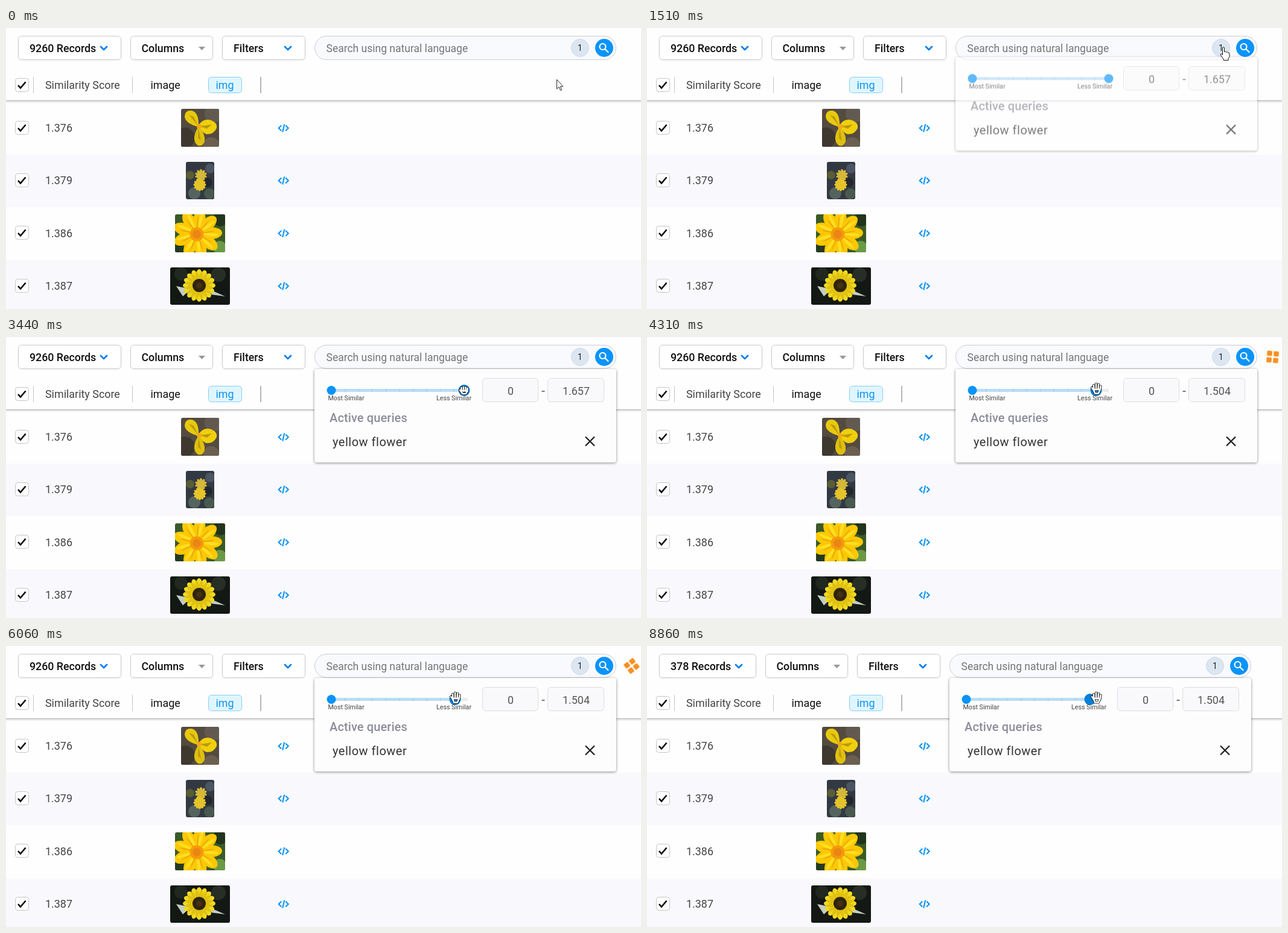
These frames come from a looping animation (1052 by 466 pixels, 9.48 s). An HTML page:

```html
<!DOCTYPE html>
<html lang="en">
<head>
<meta charset="utf-8">
<title>Similarity search</title>
<style>
@property --drag { syntax: '<length>'; inherits: true; initial-value: 0px; }
@property --gap { syntax: '<length>'; inherits: true; initial-value: 0px; }

html, body { margin: 0; width: 100%; height: 100%; overflow: hidden; background: #fefefe; }
svg { display: block; width: 1052px; height: 466px; }
text { font: 400 17.9px Roboto, Arial, sans-serif; fill: #444; }
.dark { fill: #111; }
.medium { font-weight: 500; font-size: 17.8px; fill: #111; }
.hint { font-size: 17.5px; fill: #757575; }
.blue { fill: #0b93f6; }
.mid { text-anchor: middle; fill: #555; }
.tiny { font-size: 10.7px; fill: #444; }
.query { font-size: 20px; letter-spacing: .5px; fill: #333; }
.title { font-size: 20px; font-weight: 500; letter-spacing: .1px; fill: #8c8d9b; }
.line { fill: none; stroke-linecap: round; stroke-linejoin: round; }
.btn { fill: #fff; stroke: #cbcbcb; filter: drop-shadow(0 1px 1px #0001); }
.field { fill: #f9f9fb; stroke: #dcdde2; }

/* one loop is 9480 ms */
.bar, .wide, .old, .new, .arrow, .point, .open, .fist, .spin, .dim, .lit, .before, .after, .loader
  { animation: 9480ms step-end infinite; }
.panel, .drag, .cursor, .squares { animation: 9480ms linear infinite; }

.bar { animation-name: bar; }
@keyframes bar { 0% { transform: none } 82.81%, to { transform: translateX(-10px) } }
.wide { animation-name: wide; }
@keyframes wide { 0% { width: 170px } 82.81%, to { width: 160px } }
.old { animation-name: old; }
@keyframes old { 0% { opacity: 1 } 82.81%, to { opacity: 0 } }
.new { animation-name: new; }
@keyframes new { 0% { opacity: 0 } 82.81%, to { opacity: 1 } }

.panel { animation-name: panel; }
@keyframes panel {
  0%, 14.24% { opacity: 0; transform: translateY(-13px) }
  16.88%, to { opacity: 1; transform: none }
}
.spin { animation-name: spin; }
@keyframes spin { 0% { opacity: 0 } 21.41% { opacity: 1 } 24.79%, to { opacity: 0 } }
.dim { animation-name: dim; }
@keyframes dim { 0% { opacity: 1 } 26.58%, to { opacity: 0 } }
.lit { animation-name: lit; }
@keyframes lit { 0% { opacity: 0 } 26.58%, to { opacity: 1 } }
.before { animation-name: before; }
@keyframes before { 0% { opacity: 1 } 43.25%, to { opacity: 0 } }
.after { animation-name: after; }
@keyframes after { 0% { opacity: 0 } 43.25%, to { opacity: 1 } }

.drag { animation-name: drag; }
@keyframes drag {
  0%, 32.7% { --drag: 0px }
  36.29% { --drag: 6px }
  41.77%, to { --drag: 21px }
}
.knob { transform: translateX(calc(0px - var(--drag))); }
.fill { width: calc(226px - var(--drag)); }

.cursor { animation-name: cursor; }
@keyframes cursor {
  0% { transform: translate(912px, 85px) }
  4.32% { transform: translate(912px, 85px); animation-timing-function: ease-in-out }
  8.65% { transform: translate(955px, 31px) }
  19.94% { transform: translate(955px, 31px); animation-timing-function: ease-in-out }
  22.89% { transform: translate(810px, 87px); animation-timing-function: ease-out }
  29.75%, 32.7% { transform: translate(764px, 88px) }
  36.29% { transform: translate(758px, 88px) }
  41.77%, to { transform: translate(744px, 85px) }
}
.arrow { animation-name: arrow; }
@keyframes arrow { 0% { opacity: 1 } 7.38% { opacity: 0 } 20.6% { opacity: 1 } 26.58%, to { opacity: 0 } }
.point { animation-name: point; }
@keyframes point { 0% { opacity: 0 } 7.38% { opacity: 1 } 20.6%, to { opacity: 0 } }
.open { animation-name: open; }
@keyframes open { 0% { opacity: 0 } 26.58% { opacity: 1 } 32.7% { opacity: 0 } 43.25%, to { opacity: 1 } }
.fist { animation-name: fist; }
@keyframes fist { 0% { opacity: 0 } 32.7% { opacity: 1 } 43.25%, to { opacity: 0 } }
.edge { fill: #111; stroke: #111; stroke-width: 4.2px; }
.skin { fill: #fff; stroke: #fff; stroke-width: 2.5px; }

.loader { animation-name: loader; }
@keyframes loader { 0% { opacity: 0 } 43.67% { opacity: 1 } 82.81%, to { opacity: 0 } }
.squares { animation-name: squares; }
@keyframes squares {
  0%, 43.67% { --gap: 0px; transform: rotate(45deg) }
  45.15% { --gap: 5.5px; transform: rotate(90deg) }
  50.53%, 52.32% { --gap: 5.5px; transform: rotate(180deg) }
  54.54% { --gap: 0px; transform: rotate(225deg) }
  57.81%, 59.28% { --gap: 0px; transform: rotate(315deg) }
  60.76% { --gap: 5.5px; transform: rotate(360deg) }
  66.14%, 67.93% { --gap: 5.5px; transform: rotate(450deg) }
  70.15% { --gap: 0px; transform: rotate(495deg) }
  73.42%, 74.89% { --gap: 0px; transform: rotate(585deg) }
  76.37% { --gap: 5.5px; transform: rotate(630deg) }
  81.75%, to { --gap: 5.5px; transform: rotate(720deg) }
}
.squares rect {
  x: -4.2px; y: -4.2px; width: 8.4px; height: 8.4px; rx: 1.5px; fill: #f78f1e;
  transform: translate(calc(var(--gap) * var(--x)), calc(var(--gap) * var(--y)));
}
</style>
</head>
<body>
<svg viewBox="0 0 1052 466">
  <defs>
    <g id="check">
      <rect x="-11" y="-11" width="22" height="22" rx="4" fill="#fff" stroke="#c4c4c4"/>
      <path d="M-6.500 .5l4 4.500L6-5" fill="none" stroke="#000" stroke-width="2.500"/>
    </g>
    <path id="code" d="M-3.500-4.500L-8 0l4.500 4.500M3.500-4.500L8 0 3.500 4.500M1.500-6.500l-3 13" fill="none" stroke="#0b93f6" stroke-width="2.100"/>
    <path id="chev" class="line" d="M-5-2.500L0 2.500 5-2.500" stroke="#0a80ee" stroke-width="2.800"/>
    <g id="hand" class="line">
      <path d="M-3.500 2L-4-5M0 2V-7.500M3.500 2L4-6.500M6.500 3L7.500-3.500M-7-1l4 6"/>
      <path d="M-4 2H6.500L4 8.500h-6z" style="fill:inherit"/>
    </g>
    <g id="grip" class="line">
      <path d="M-3.500 2V-4M0 2V-5M3.500 2V-4.500M6.500 2V-3M-6 0l3 4"/>
      <path d="M-4 1H6.500L4 6h-6z" style="fill:inherit"/>
    </g>
    <linearGradient id="fade" x2="0" y2="1">
      <stop stop-color="#000" stop-opacity=".12"/><stop offset="1" stop-color="#000" stop-opacity="0"/>
    </linearGradient>
  </defs>

  <rect width="1052" height="466" fill="#fefefe"/>
  <g id="rows"></g>

  <rect y="121" width="1052" height="4" fill="url(#fade)"/>
  <path d="M0 120.5H1052" stroke="#b0b0b0"/>
  <use href="#check" x="26.5" y="94.5"/>
  <path d="M45.5 81v27M209.5 81v27" stroke="#c4c4c4"/>
  <path d="M422 81v27" stroke="#a4a4a4" stroke-width="1.6"/>
  <text x="65" y="101">Similarity Score</text>
  <text class="dark" x="239.5" y="101">image</text>
  <rect x="335.5" y="81.5" width="55" height="26" rx="5" fill="#e0f6ff" stroke="#84cdf8"/>
  <text class="blue" x="347.5" y="101">img</text>

  <rect class="btn wide" x="20.5" y="13.5" width="170" height="39" rx="5"/>
  <text class="medium old" x="39" y="40">9260 Records</text>
  <text class="medium new" x="39" y="40">378 Records</text>

  <g class="bar">
    <use href="#chev" x="162" y="33.5"/>
    <rect class="btn" x="206.5" y="13.5" width="136" height="39" rx="5"/>
    <text class="medium" x="224.5" y="40">Columns</text>
    <path d="M319 31h11l-5.5 6z" fill="#999"/>
    <rect class="btn" x="358.5" y="13.5" width="137" height="39" rx="5"/>
    <text class="medium" x="377" y="40">Filters</text>
    <use href="#chev" x="467" y="33.5"/>

    <rect x="511.5" y="13.5" width="499" height="39" rx="19.5" fill="#f9fafe" stroke="#c9ccd6"/>
    <text class="hint" x="530.5" y="40">Search using natural language</text>
    <circle cx="951" cy="33" r="14.5" fill="#dce6f2" stroke="#cdd8e6"/>
    <text class="mid" x="951" y="38" style="font-size:14px;fill:#222">1</text>
    <circle cx="991" cy="33" r="15" fill="#0a93f9"/>
    <g class="line" stroke="#fff" stroke-width="2.2"><circle cx="988.5" cy="31" r="5"/><path d="M992.5 35l5 5"/></g>

    <g class="panel">
      <rect x="511" y="53" width="500" height="155" rx="4" fill="#fdfdfd" style="filter:drop-shadow(0 1px 2px #0007)"/>
      <g class="drag">
        <rect x="539" y="86" width="226" height="5" fill="#e4edf4"/>
        <rect class="fill" x="539" y="86" width="226" height="5" fill="#b8ddf7"/>
        <path id="ticks" stroke="#9cc9e6"/>
        <circle cx="539" cy="88.5" r="7.5" fill="#0a93f9"/>
        <g class="knob">
          <circle class="dim" cx="765" cy="88.5" r="7.5" fill="#0a93f9"/>
          <circle class="lit" cx="765" cy="88.5" r="9.5" fill="#087fd8"/>
        </g>
      </g>
      <text class="tiny" x="533.5" y="105">Most Similar</text>
      <text class="tiny" x="713" y="105">Less Similar</text>

      <rect class="field" x="789.5" y="68.5" width="92" height="39" rx="5"/>
      <text class="mid" x="836" y="96">0</text>
      <g class="spin">
        <rect x="864" y="80" width="16" height="17" fill="#ededed"/>
        <path d="M868 86.5l4-5 4 5zM868 90.5l4 5 4-5z" fill="#505050"/>
      </g>
      <path d="M887.5 90h5" stroke="#555" stroke-width="1.6"/>
      <rect class="field" x="897.5" y="68.5" width="93" height="39" rx="5"/>
      <text class="mid before" x="944.5" y="96">1.657</text>
      <text class="mid after" x="944.5" y="96">1.504</text>

      <text class="title" x="536" y="140.5">Active queries</text>
      <text class="query" x="541" y="180.5">yellow flower</text>
      <path d="M960 165.5l15 15m0-15l-15 15" stroke="#222" stroke-width="2.3"/>
    </g>
  </g>

  <g class="loader"><g transform="translate(1036.5 33)"><g class="squares">
    <rect style="--x:-1;--y:-1"/>
    <rect style="--x:1;--y:-1"/>
    <rect style="--x:-1;--y:1"/>
    <rect style="--x:1;--y:1"/>
  </g></g></g>

  <g class="cursor" fill="#fff" stroke="#111" stroke-linejoin="round">
    <path class="arrow" stroke-width=".9" d="M.5.5v15.5l3.600-3.400 2.500 5.900 2.200-.9-2.500-5.700H11z"/>
    <path class="point" d="M-1.500 1.500q1.500-2 3 0v7q2-1.500 3 .6 2-1 3 .8 2-.6 2.500 1.200v5.400l-2 3.500v2.500H0v-2l-4.500-6.500q-.8-2.500 1-2.300l2 1.800z"/>
    <g class="open"><use href="#hand" class="edge"/><use href="#hand" class="skin"/></g>
    <g class="fist"><use href="#grip" class="edge"/><use href="#grip" class="skin"/></g>
  </g>
</svg>
<script>
const petals = (n, x, y, far, rx, ry, color, turn = 0) => {
  let out = '';
  for (let i = 0; i < n; i++)
    out += `<ellipse cx="${x}" cy="${y - far}" rx="${rx}" ry="${ry}" fill="${color}"
      transform="rotate(${turn + i * 360 / n} ${x} ${y})"/>`;
  return out;
};
const disc = (x, y, r, color) => `<circle cx="${x}" cy="${y}" r="${r}" fill="${color}"/>`;
const shape = (d, color) => `<path d="${d}" fill="${color}"/>`;

const rows = [
  { y: 166, score: '1.376', w: 63, h: 63, bg: '#544b40', art:
    disc(54, 8, 15, '#625a50') + disc(6, 48, 17, '#3f382f') + disc(50, 60, 13, '#6b604f') +
    shape('M29 30Q6 24 6 12 7 2 17 3 30 5 29 30', '#e9c90c') +
    shape('M29 28Q36 15 50 19 61 24 59 32 54 43 42 42 33 39 29 28', '#f0cf0c') +
    shape('M29 30Q41 42 39 54 36 63 28 61 21 56 22 46 24 36 29 30', '#dfc00e') +
    shape('M28 28L13 10l8 3zM31 29l20-3-8 7zM29 33l4 20-5-5z', '#b99a0c') + disc(30, 29, 4, '#f3a818') },
  { y: 253, score: '1.379', w: 47, h: 62, bg: '#333943', art:
    disc(7, 22, 7, '#595c35') + disc(40, 11, 8, '#4b5563') + disc(14, 52, 10, '#55635f') +
    disc(39, 53, 9, '#48594f') + disc(36, 34, 8, '#23272e') +
    petals(10, 25, 22, 5, 2.2, 5, '#d3b83a') + petals(12, 23, 38, 5.5, 2.4, 5, '#e5c42a') },
  { y: 340.5, score: '1.386', w: 83, h: 63, bg: '#3a5a28', art:
    disc(75, 8, 12, '#22341d') + disc(74, 55, 11, '#6a9a45') + disc(8, 57, 10, '#243a20') +
    petals(9, 37, 32, 23, 10, 18, '#fcc805', 8) + petals(9, 37, 32, 22, 2.5, 14, '#ffdf20', 14) +
    petals(9, 37, 32, 17, 1, 12, '#e9a608', 2) +
    disc(36, 33, 11.5, '#f69a0b') + disc(36, 33, 7, '#e98714') },
  { y: 428, score: '1.387', w: 99, h: 62, bg: '#141814', art:
    disc(80, 12, 12, '#272e26') + disc(18, 11, 11, '#20281f') +
    shape('M10 31l24 5-13 12zM66 37l25 11-23-3z', '#c4cec0') +
    petals(16, 48, 30, 18, 5, 9, '#f1d922') + petals(16, 48, 30, 15, 3, 8, '#e0c210', 11) +
    disc(48, 30, 11, '#30230f') + disc(48, 30, 5, '#46310f') }
];

document.getElementById('rows').innerHTML =
  '<path d="M0 210H1052V297H0zM0 385H1052V466H0z" fill="#f9f9fd"/>' +
  rows.map((r, i) => `
    <use href="#check" x="26.5" y="${Math.floor(r.y) - .5}"/>
    <text x="65" y="${r.y + 6}">${r.score}</text>
    <clipPath id="clip${i}"><rect width="${r.w}" height="${r.h}" rx="3"/></clipPath>
    <g transform="translate(${Math.round(321.4 - r.w / 2)} ${Math.round(r.y - r.h / 2 - .3)})" clip-path="url(#clip${i})">
      <rect width="${r.w}" height="${r.h}" fill="${r.bg}"/>${r.art}
    </g>
    <use href="#code" x="459.7" y="${r.y}"/>`).join('');

let ticks = '';
for (let i = 1; i < 10; i++) ticks += `M${539 + i * 22.6} 86v5`;
document.getElementById('ticks').setAttribute('d', ticks);
</script>
</body>
</html>
```
